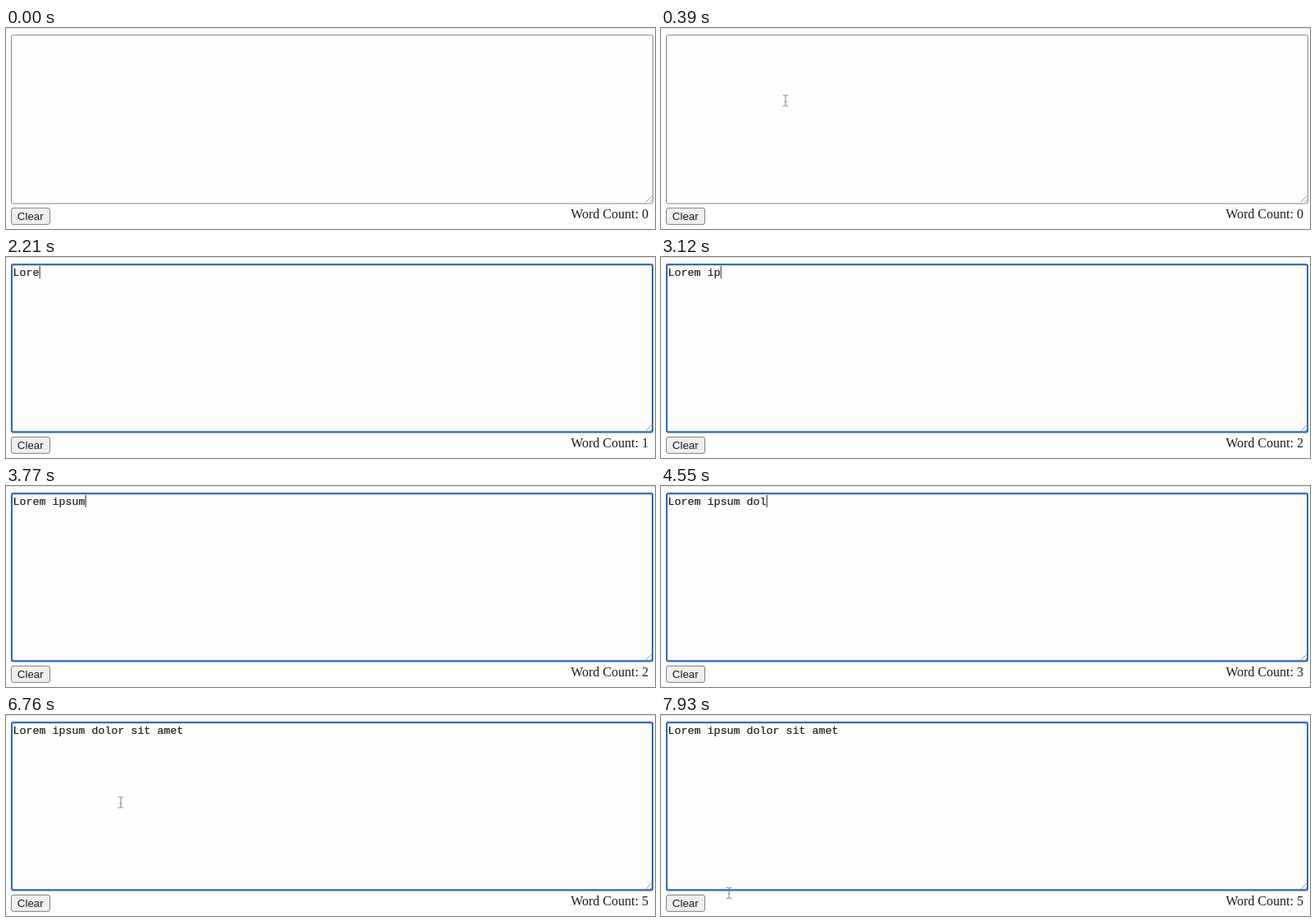
Animation, 792 px wide and 245 px high, one loop 8 s. Source, as an HTML page:

```html
<!DOCTYPE html>
<html lang="en">
<head>
<meta charset="utf-8">
<title>Word counter</title>
<style>
  html, body { margin: 0; width: 100%; height: 100%; overflow: hidden; background: #fff; }
  svg { display: block; width: 792px; height: 245px; }
  text { white-space: pre; fill: #1c1c1c; }
  .typed { font: 13.333px "Liberation Mono", "Courier New", monospace; stroke: #1c1c1c; stroke-width: .2; }
  .label { font: 13.333px "Liberation Sans", Arial, sans-serif; }
  .count { font: 16px "Liberation Serif", Times, serif; }
</style>
</head>
<body>
<svg viewBox="0 0 792 245">
  <rect width="792" height="1" fill="#e2e2e4"/>

  <rect x="6.5" y="8.6" width="783" height="205.4" rx="2" fill="#fefefe" stroke="#858585"/>
  <rect id="ring" x="7" y="9.3" width="782" height="204" rx="2" fill="#fefefc" stroke="#2a69c0" stroke-width="2"/>
  <path d="M780.5 212.5l8-8M785.5 212.5l3-3" stroke="#8c8c8c" stroke-width=".9" fill="none"/>

  <text id="typed" class="typed" x="8.6" y="23"></text>
  <rect id="caret" y="11" width="1" height="15" fill="#222"/>

  <rect x="6.5" y="219.4" width="47" height="20" rx="2.5" fill="#efefef" stroke="#808080"/>
  <text class="label" x="13.8" y="234">Clear</text>
  <text id="count" class="count" x="783.9" y="232.3" text-anchor="end"></text>

  <path id="mouse" d="M-3.2 -6.5h2q1.2 0 1.2 1.3q0 -1.3 1.2 -1.3h2M0 -5.2v10.4M-3.2 6.5h2q1.2 0 1.2 -1.3q0 1.3 1.2 1.3h2M-1.3 1h2.6" fill="none" stroke="#777" stroke-width=".9"/>
</svg>
<script>
const LOOP = 8000, TICK = 130, BLINK = 520;
const FOCUS = 520, TYPE_START = 1690, TYPE_END = 6240, MOUSE_BACK = 6370, MOUSE_END = 7930;
const PHRASE = "Lorem ipsum dolor sit amet";

// Typing pace: [tick, letters typed]
const pace = [[12, 0], [13, 1], [19, 6], [24, 8], [30, 12], [35, 15], [42, 22], [48, 26]];

const $ = id => document.getElementById(id);
const [ring, typed, caret, count, mouse] = ["ring", "typed", "caret", "count", "mouse"].map($);
const show = (el, on) => el.setAttribute("visibility", on ? "visible" : "hidden");
const mix = (a, b, u) => a + (b - a) * u;

function lettersAt(tick) {
  const i = pace.findIndex(p => p[0] > tick);
  if (i < 0) return PHRASE.length;
  if (i === 0) return 0;
  const [t0, n0] = pace[i - 1], [t1, n1] = pace[i];
  return Math.floor(mix(n0, n1, (tick - t0) / (t1 - t0)) + 1e-6);
}

// Solid while typing, blinking after the click and after the last key
function caretOn(t) {
  if (t < FOCUS) return false;
  if (t >= TYPE_START && t < TYPE_END) return true;
  const since = t - (t < TYPE_START ? FOCUS : TYPE_END);
  return Math.floor(since / BLINK) % 2 === 0;
}

// Rests where it clicked, hides while typing, then speeds up towards the button
function mouseAt(t) {
  if (t < MOUSE_BACK) return [152, 88.5];
  const u = Math.min(1, (t - MOUSE_BACK) / (MOUSE_END - MOUSE_BACK)) ** 2;
  return [mix(143.8, 83, u), mix(99.1, 217, u)];
}

function draw(time) {
  const tick = Math.floor(time / TICK), t = tick * TICK;
  const text = PHRASE.slice(0, lettersAt(tick));
  typed.textContent = text;
  count.textContent = "Word Count: " + (text.match(/\S+/g) || []).length;
  caret.setAttribute("x", 8.7 + text.length * 8);
  show(caret, caretOn(t));
  show(ring, t >= FOCUS);
  show(mouse, (t >= 390 && t < TYPE_START) || t >= MOUSE_BACK);
  mouse.setAttribute("transform", `translate(${mouseAt(t)})`);
}

const start = performance.now();
function frame() {
  draw((performance.now() - start) % LOOP);
  requestAnimationFrame(frame);
}
frame();
</script>
</body>
</html>
```
